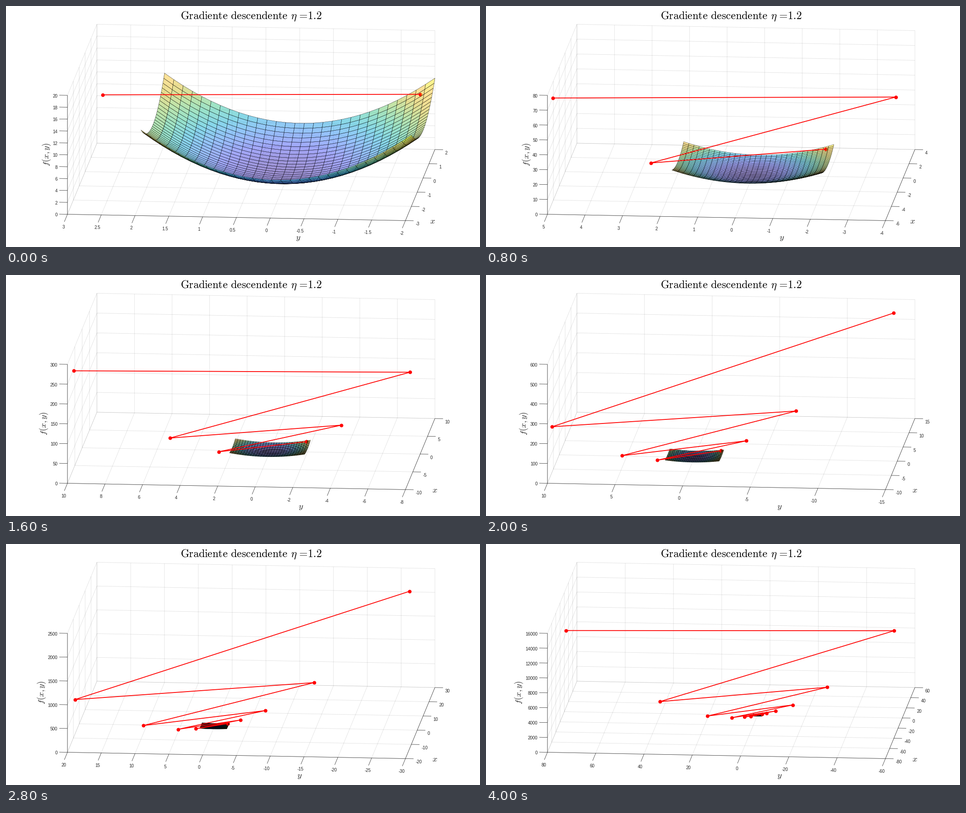
Animation, 1049 px wide and 534 px high, one loop 4.4 s. Source, as a matplotlib script:

```python
import math
import numpy as np
import matplotlib.pyplot as plt
from matplotlib.animation import FuncAnimation
from matplotlib.collections import LineCollection, PolyCollection
from matplotlib.colors import LinearSegmentedColormap

W, H, DPI = 1049, 534, 64
PX = 72 / DPI                      # points per pixel
STEPS, INTERVAL = 11, 400
ETA, START = 1.2, np.array([1.8, -1.8])
DARK = "#262626"

plt.rcParams["mathtext.fontset"] = "cm"
plt.rcParams["font.family"] = "Liberation Sans"

PARULA = LinearSegmentedColormap.from_list("bowl", [
    "#3e26a8", "#4852f4", "#2e87f7", "#12b1d6", "#37c897",
    "#81cc59", "#d1bf27", "#fec834", "#f9fb15"])

# Screen vectors of the oblique axes box
ORIGIN = np.array([136.0, 461.5])
U = np.array([748.0, 14.0])        # y axis, running from high to low
V = np.array([65.2, -157.5])       # x axis
Z = np.array([0.0, -263.5])        # z axis
TICK = 18.0

fig = plt.figure(figsize=(W / DPI, H / DPI), dpi=DPI, facecolor="white")
ax = fig.add_axes([0, 0, 1, 1])


def f(x, y):
    return x ** 2 + 2 * y ** 2


def nice_limits(lo, hi, most):
    """Tightest round limits with at most `most` intervals."""
    options = []
    for k in range(-1, 5):
        for m in (1, 2, 5):
            step = m * 10.0 ** k
            a, b = math.floor(lo / step), math.ceil(hi / step)
            if b - a <= most:
                options.append((a * step, b * step, step))
    return min(options, key=lambda o: round(o[1] - o[0], 6))


def ticks(lim):
    lo, hi, step = lim
    return lo + step * np.arange(round((hi - lo) / step) + 1)


def place(u, v, w):
    u, v, w = (np.asarray(a, float)[..., None] for a in (u, v, w))
    return ORIGIN + u * U + v * V + w * Z


def frac(a, lim):
    return (np.asarray(a) - lim[0]) / (lim[1] - lim[0])


def text_width(s):
    return sum({"-": 3.3, ".": 2.7}.get(c, 5.45) for c in s)


def label(x, y, s, size, **kw):
    ax.text(x, y, s, fontsize=size * PX, **kw)


def segments(lines, width, **kw):
    ax.add_collection(LineCollection(lines, linewidths=width * PX, **kw))


def draw_axes(xl, yl, zl):
    xt, yt, zt = ticks(xl), ticks(yl), ticks(zl)
    us, vs, ws = 1 - frac(yt, yl), frac(xt, xl), frac(zt, zl)

    grid = []
    for u in us:
        grid.append(place([u, u, u], [0, 1, 1], [0, 0, 1]))
    for v in vs:
        grid.append(place([1, 0, 0], [v, v, v], [0, 0, 1]))
    for w in ws:
        grid.append(place([0, 0, 1], [0, 1, 1], [w, w, w]))
    segments(grid, 0.8, colors=DARK, alpha=0.15, zorder=1)

    along_u = TICK * U / np.hypot(*U)
    along_v = TICK * V / np.hypot(*V)
    lines = [place([0, 0, 1, 1], [0, 0, 0, 1], [1, 0, 0, 0])]
    style = dict(size=9.8, color=DARK)
    names = [["%g" % t for t in axis] for axis in (xt, yt, zt)]
    for v, s in zip(vs, names[0]):
        p = place(1, v, 0)
        q = p + along_u
        lines.append([p, q])
        label(q[0] + 4.5, q[1] + 6.5, s, ha="left", va="center_baseline", **style)
    for u, s in zip(us, names[1]):
        p = place(u, 0, 0)
        q = p - along_v
        lines.append([p, q])
        label(q[0] - 1.5, q[1] + 10.5, s, ha="center", va="center_baseline", **style)
    for w, s in zip(ws, names[2]):
        p = place(0, 0, w)
        q = p - along_u
        lines.append([p, q])
        label(q[0] - 4, q[1] + 1, s, ha="right", va="center_baseline", **style)
    segments(lines, 0.75, colors=DARK, zorder=2)

    # Axis names move away as the tick labels widen
    wx, wy, wz = (max(map(text_width, n)) for n in names)
    label(935 + wx, 482, "$x$", 18.7, color=DARK, ha="center", va="baseline")
    label(663.5 - wy, 518, "$y$", 18.7, color=DARK, ha="center", va="baseline")
    label(100.5 - wz, 329, "$f(x,y)$", 18.7, color=DARK, rotation=90,
          ha="center", va="center")


def draw_surface(project):
    g = np.linspace(-2, 2, 30)
    z = f(g[:, None], g[None, :])
    x, y = np.meshgrid(g, g, indexing="ij")
    p = project(x, y, z)
    tone = (z - z.min()) / (z.max() - z.min())
    order = [(i, j) for i in range(28, -1, -1) for j in range(28, -1, -1)]
    quads = [[p[i, j], p[i + 1, j], p[i + 1, j + 1], p[i, j + 1]]
             for i, j in order]
    faces = PARULA([tone[i, j] for i, j in order])
    faces[:, 3] = 0.5
    # Neighbours share edges, so each line is drawn twice and kept thin
    ax.add_collection(PolyCollection(quads, facecolors=faces, edgecolors="black",
                                     linewidths=0.42 * PX, zorder=4))


def draw_path(pts):
    dot = dict(marker="o", ms=8 * PX, mew=0, color="red", ls="none")
    ax.plot(*pts[0], zorder=3, **dot)
    ax.plot(*pts.T, color="red", lw=1.8 * PX, zorder=5)
    # The start touches the surface, which covers its right half
    ax.plot(*pts[0], fillstyle="left", markerfacecoloralt="none", zorder=6, **dot)
    ax.plot(*pts[1:].T, zorder=6, **dot)


def draw(i):
    ax.clear()
    ax.set_axis_off()
    ax.set_xlim(0, W)
    ax.set_ylim(H, 0)

    walk = START * (1 - 2 * ETA) ** np.arange(i + 2)[:, None]
    x, y = walk.T
    z = f(x, y)
    xl = nice_limits(min(x.min(), -2), max(x.max(), 2), 8)
    yl = nice_limits(min(y.min(), -2), max(y.max(), 2), 10)
    zl = nice_limits(0, max(z.max(), 12), 10)

    def project(x, y, z):
        return place(1 - frac(y, yl), frac(x, xl), frac(z, zl))

    label(542.3, 28.5, r"$\mathrm{Gradiente}\hspace{0.38}\mathrm{descendente}"
          r"\hspace{0.38}\eta\hspace{0.12}=\hspace{-0.2}1.2$", 23.9,
          color="black", ha="center", va="baseline")
    draw_axes(xl, yl, zl)
    draw_surface(project)
    draw_path(project(x, y, z))
    return []


anim = FuncAnimation(fig, draw, frames=STEPS, init_func=lambda: [],
                     interval=INTERVAL, repeat=True, repeat_delay=0)
plt.show()
```
